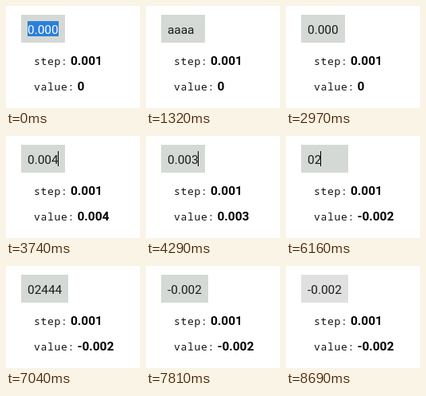
Recreate the animation shown at these times as an HTML page. Size 168 by 128 pixels, loop 8.8 s.

```html
<!DOCTYPE html>
<html lang="en">
<head>
<meta charset="utf-8">
<title>Numeric input</title>
<style>
  html, body { margin: 0; width: 100%; height: 100%; overflow: hidden; background: #fff; }
  svg { display: block; }
  text { font: 15.4px Roboto, sans-serif; fill: #1c1c1c; white-space: pre; }
  .label { font: 13px "Noto Sans Mono", monospace; letter-spacing: 0.7px; fill: #111; }
  .bold { font-weight: 700; fill: #000; }
</style>
</head>
<body>
<svg width="168" height="128" viewBox="0 0 168 128">
  <rect id="field" x="19" y="11" width="55" height="35"/>
  <rect id="selection" x="27" y="19" height="19" fill="#2b7fdb"/>
  <text id="entry" x="27" y="35"></text>
  <rect id="caret" y="19" width="1" height="19" fill="#000"/>
  <text class="label" x="35" y="74">step:</text>
  <text class="bold" x="81" y="74">0.001</text>
  <text class="label" x="35" y="106">value:</text>
  <text class="bold" id="value" x="89.5" y="106"></text>
</svg>
<script>
const LOOP = 8800;
const $ = id => document.getElementById(id);
const [field, selection, entry, caret, value] =
  ["field", "selection", "entry", "caret", "value"].map($);

// Each event: time, then only the properties that change.
const events = [
  [0, { text: "0.000", value: 0, mode: "selected", fill: "#d5d9d5" }],
  ...type("aaaa", [440, 660, 770, 770]),
  [1320, { mode: "idle" }],
  [1540, { text: "0.000", mode: "caret" }],
  [1980, { mode: "idle" }],
  [2530, { mode: "caret" }],
  [2970, { mode: "idle" }],
  ...spin([3080, 3300, 3520, 3740], 1, 1),
  [3850, { mode: "idle" }],
  ...spin([3960, 4180, 4290, 4400, 4510, 4730, 4840, 4950], 5, -1),
  [5280, { mode: "selected" }],
  ...type("02444", [5720, 6160, 6270, 6490, 6600]),
  [7040, { mode: "idle" }],
  [7370, { text: "-0.002", mode: "caret" }],
  [7810, { mode: "idle" }],
  [8360, { mode: "caret" }],
  [8690, { mode: "idle", fill: "#e1e0e1" }]
];

// One more character per key time.
function type(text, times) {
  return times.map((time, i) => [time, { text: text.slice(0, i + 1), mode: "caret" }]);
}

// Arrow keys: one thousandth per press.
function spin(times, first, direction) {
  return times.map((time, i) => {
    const n = first + i * direction;
    return [time, { text: (n / 1000).toFixed(3), value: n, mode: "caret" }];
  });
}

function stateAt(time) {
  return Object.assign({}, ...events.filter(e => e[0] <= time).map(e => e[1]));
}

function draw(time) {
  const s = stateAt(time);
  entry.textContent = s.text;
  entry.style.fill = s.mode === "selected" ? "#fff" : "";
  value.textContent = s.value ? (s.value / 1000).toFixed(3) : "0";
  field.setAttribute("width", s.value < 0 ? 59 : 55);
  field.setAttribute("fill", s.fill);
  const width = Math.round(entry.getComputedTextLength());
  selection.setAttribute("width", s.mode === "selected" ? width : 0);
  caret.setAttribute("x", 26 + width);
  caret.setAttribute("visibility", s.mode === "caret" ? "visible" : "hidden");
}

const start = performance.now();
function tick() {
  draw((performance.now() - start) % LOOP);
  requestAnimationFrame(tick);
}
tick();
</script>
</body>
</html>
```
